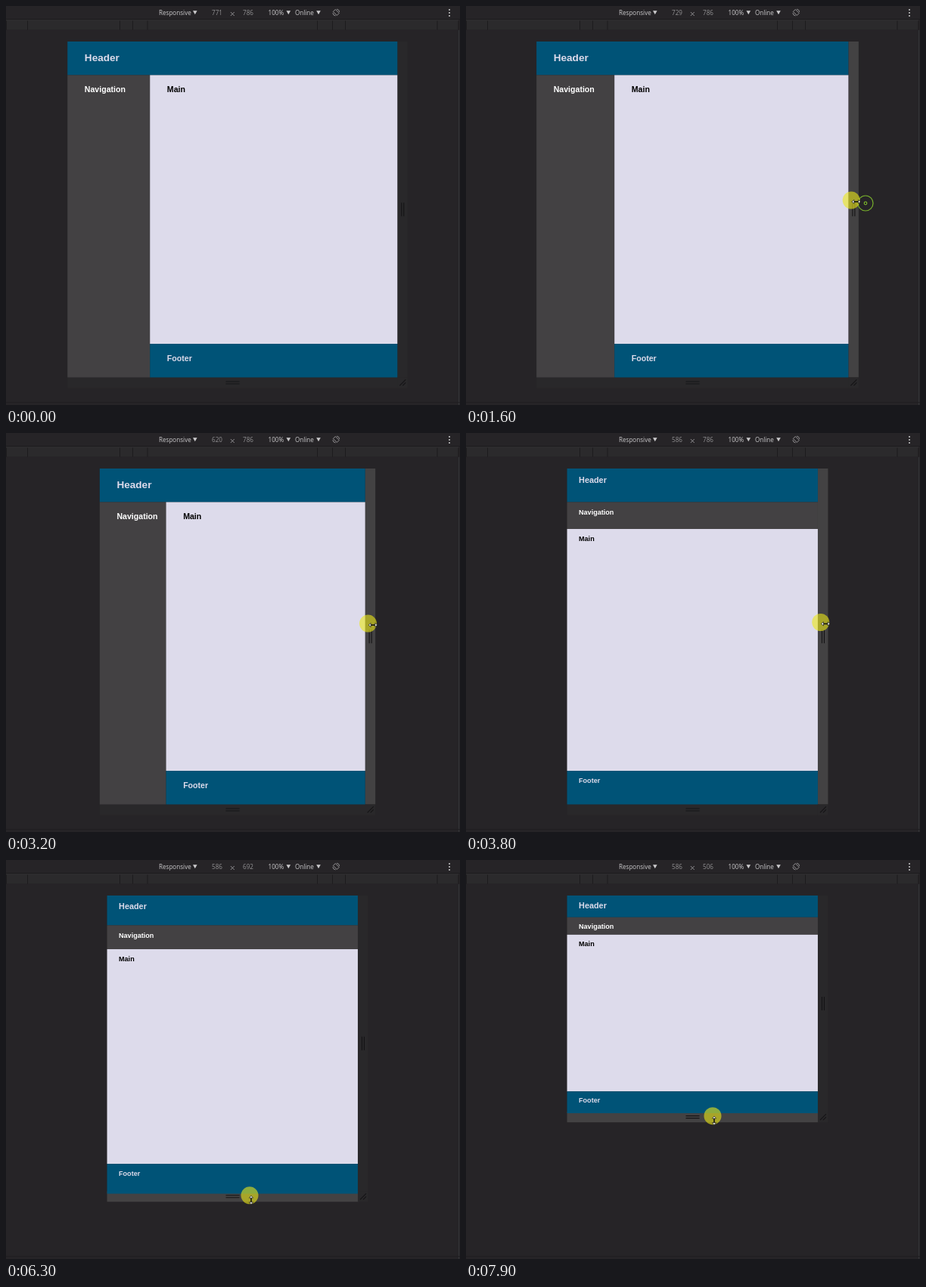
An HTML page that plays this animation: 600x528 px, repeating every 8 s.

```html
<!DOCTYPE html>
<html lang="en">
<head>
<meta charset="utf-8">
<title>Responsive layout</title>
<style>
  html, body { margin: 0; width: 100%; height: 100%; overflow: hidden; background: #262427; }
  svg { display: block; width: 600px; height: 528px; }
  .ui { font: 8.1px "Open Sans", "Noto Sans", sans-serif; fill: #cbcacc; }
  .dim { fill: #939294; }
  .page { font-family: "Liberation Sans", Arial, sans-serif; font-weight: bold; fill: #dddbeb; }
  .grip { stroke: #151416; stroke-width: 1.1; fill: none; }
</style>
</head>
<body>
<svg viewBox="0 0 600 528">
  <rect width="600" height="528" fill="#262427"/>
  <rect y="17" width="600" height="1" fill="#1d1c1e"/>
  <rect y="18.5" width="598" height="1" fill="#363538"/>
  <rect y="19.5" width="598" height="11.5" fill="#2b2a2c"/>
  <path d="M.5 19.5v12M28.5 19.5v12M150.5 19.5v12M167.5 19.5v12M187 19.5v12M411.5 19.5v12M431.5 19.5v12M448.5 19.5v12M570 19.5v12M598 19.5v12" stroke="#1c1b1d"/>
  <path d="M598.5 32V528" stroke="#343638"/>
  <path d="M0 524.5H600" stroke="#1f1d20"/>

  <g class="ui">
    <text x="202" y="12">Responsive</text>
    <text x="346.5" y="12">100%</text>
    <text x="382" y="12">Online</text>
    <g class="dim">
      <text id="widthLabel" x="279" y="12" text-anchor="middle"></text>
      <text id="heightLabel" x="320" y="12" text-anchor="middle"></text>
    </g>
    <path d="M247 6.3h5.6l-2.8 5zM370.5 6.3h5.6l-2.8 5zM410.2 6.3h5.6l-2.8 5z"/>
    <path d="M296.8 8l5 5m0-5l-5 5" stroke="#aaa9ab" stroke-width=".8"/>
    <g fill="none" stroke="#aaa9ab" stroke-width=".8">
      <rect x="434.2" y="5" width="4.2" height="7" transform="rotate(-45 436.3 8.5)"/>
      <path d="M437 4.2q3.500.4 3.700 3.800M435.600 12.900q-3.500-.4-3.700-3.800"/>
    </g>
    <circle cx="586" cy="5" r="1"/><circle cx="586" cy="9" r="1"/><circle cx="586" cy="13" r="1"/>
  </g>

  <rect id="rightBar"/>
  <rect id="bottomBar"/>
  <rect id="corner" width="13.5" height="14" fill="#29282a"/>
  <path id="rightGrip" class="grip" d="M-1.500-9V9M1.500-9V9"/>
  <path id="bottomGrip" class="grip" d="M-9-1.500H9M-9 1.500H9"/>
  <path id="cornerGrip" class="grip" d="M-4 4L4-4M0 4L4 0"/>

  <rect id="header" fill="#005377"/>
  <rect id="nav" fill="#434143"/>
  <rect id="main" fill="#dddbeb"/>
  <rect id="footer" fill="#005377"/>
  <g class="page">
    <text id="headerText">Header</text>
    <text id="navText" fill="#fff">Navigation</text>
    <text id="mainText" fill="#000">Main</text>
    <text id="footerText">Footer</text>
  </g>

  <g id="ring" fill="none" stroke="#78b02c" stroke-width="1.2">
    <circle id="ringOuter" cx="528" cy="261"/>
    <circle cx="528" cy="261" r="1.8"/>
  </g>
  <g id="cursor">
    <circle r="11.5" fill="#ede818" fill-opacity=".6"/>
    <path id="arrow" d="M0 0v9l2.200-2 1.500 3.200 1.400-.6-1.500-3.200h3z" fill="#fff" stroke="#111" stroke-width=".6"/>
    <g id="resizer" stroke="#111" stroke-width=".7" fill="#fff">
      <path d="M-3 0H3" stroke-width="1.600"/>
      <path d="M-5.800 0l3-2.500v5zM5.800 0l-3-2.500v5z"/>
    </g>
  </g>
</svg>
<script>
const LOOP = 8000, STEP = 100;
const SCALE = 0.5655, CENTER = 299.25, TOP = 47, BAR = 14, BREAKPOINT = 600;

// Keys are [time, value] pairs.
const WIDTH = [[1300, 771], [1600, 729], [2000, 704], [2500, 656], [2900, 641], [3700, 586]];
const HEIGHT = [[5650, 786], [6500, 663], [6900, 611], [7400, 548], [7900, 506]];
const ENTER_X = [[200, 614], [900, 521.5]];
const SIDE_Y = [[200, 235], [900, 259], [1300, 259], [1600, 257], [2500, 254], [3800, 250.5]];
const BELOW_X = [[4800, 314], [5200, 318], [5500, 318], [6900, 325], [7900, 326]];
const RISE_Y = [[4800, 541], [5200, 498]];

const $ = id => document.getElementById(id);

function along(keys, t) {
  if (t <= keys[0][0]) return keys[0][1];
  for (let i = 1; i < keys.length; i++) {
    const [t0, a] = keys[i - 1], [t1, b] = keys[i];
    if (t < t1) return a + (b - a) * (t - t0) / (t1 - t0);
  }
  return keys[keys.length - 1][1];
}

function set(id, attrs) {
  for (const name in attrs) $(id).setAttribute(name, attrs[name]);
}

const box = (id, x, y, width, height) => set(id, { x, y, width, height });
const label = (id, x, y, size) => set(id, { x, y, 'font-size': size });
const move = (id, x, y) => set(id, { transform: `translate(${x} ${y})` });
const show = (id, on) => set(id, { visibility: on ? 'inherit' : 'hidden' });

function drawPage(units, left, width, height) {
  const small = units < BREAKPOINT;
  const band = height * 0.1;
  const navTop = TOP + band, footTop = TOP + height - band;
  const navWidth = small ? width : width * 0.25;
  const navHeight = small ? height * 0.08 : height - band;
  const mainLeft = small ? left : left + navWidth;
  const mainTop = small ? navTop + navHeight : navTop;
  const mainWidth = left + width - mainLeft;

  box('header', left, TOP, width, band);
  box('nav', left, navTop, navWidth, navHeight);
  box('main', mainLeft, mainTop, mainWidth, footTop - mainTop);
  box('footer', mainLeft, footTop, mainWidth, band);

  const pad = small ? 15.5 : 22.6;
  const drop = small ? 13.1 + height * 0.0075 : 22.6;
  const size = small ? 9.05 : 10.58;
  label('headerText', left + pad, small ? TOP + 14.5 + height * 0.01 : 73.4, small ? 10.86 : 13.57);
  label('navText', left + pad, navTop + drop, size);
  label('mainText', mainLeft + pad, mainTop + drop, size);
  label('footerText', mainLeft + pad, footTop + drop, size);
}

function drawBars(t, left, right, bottom) {
  const fill = on => on ? '#434243' : '#29282a';
  box('rightBar', right, TOP, 13.5, bottom - TOP);
  box('bottomBar', left, bottom, right - left + 1, BAR);
  set('rightBar', { fill: fill(t >= 900 && t < 4600) });
  set('bottomBar', { fill: fill(t >= 5200) });
  set('corner', { x: right, y: bottom });
  move('rightGrip', right + 7, (TOP + bottom) / 2);
  move('bottomGrip', CENTER + 0.3, bottom + 7);
  move('cornerGrip', right + 7, bottom + 7);
}

function drawCursor(t, right, bottom) {
  const below = t >= 4900;
  const leaving = t >= 4600 && !below;
  let x, y;
  if (below) {
    x = along(BELOW_X, t);
    y = t < 5200 ? along(RISE_Y, t) : bottom + (t < 5700 ? 6.5 : 5.5);
  } else {
    x = leaving ? 514 : t < 1300 ? along(ENTER_X, t) : right + 3.8;
    y = along(SIDE_Y, t);
  }
  const resizing = below ? t >= 5200 : t >= 900 && !leaving;
  show('cursor', t >= 300 && t < 4700 || below);
  move('cursor', x, y);
  show('arrow', !resizing);
  show('resizer', resizing);
  set('resizer', { transform: below ? 'translate(2 6.2) rotate(90)' : 'translate(6.5 2)' });

  show('ring', t >= 1300 && t < 1800);
  set('ringOuter', { r: Math.max(2, Math.min(12, 10 + (t - 1600) / 50)) });
}

function draw(t) {
  const units = along(WIDTH, t), tall = along(HEIGHT, t);
  const width = units * SCALE, left = CENTER - width / 2, right = left + width;
  const bottom = TOP + tall * SCALE;
  $('widthLabel').textContent = Math.round(units);
  $('heightLabel').textContent = Math.round(tall);
  drawBars(t, left, right, bottom);
  // The page repaints slightly after the drag bar.
  drawPage(units, left, width, along(HEIGHT, t - 40) * SCALE);
  drawCursor(t, right, bottom);
}

const start = performance.now();
function tick() {
  const t = (performance.now() - start) % LOOP;
  draw(Math.floor(t / STEP) * STEP);
  requestAnimationFrame(tick);
}
tick();
</script>
</body>
</html>
```
